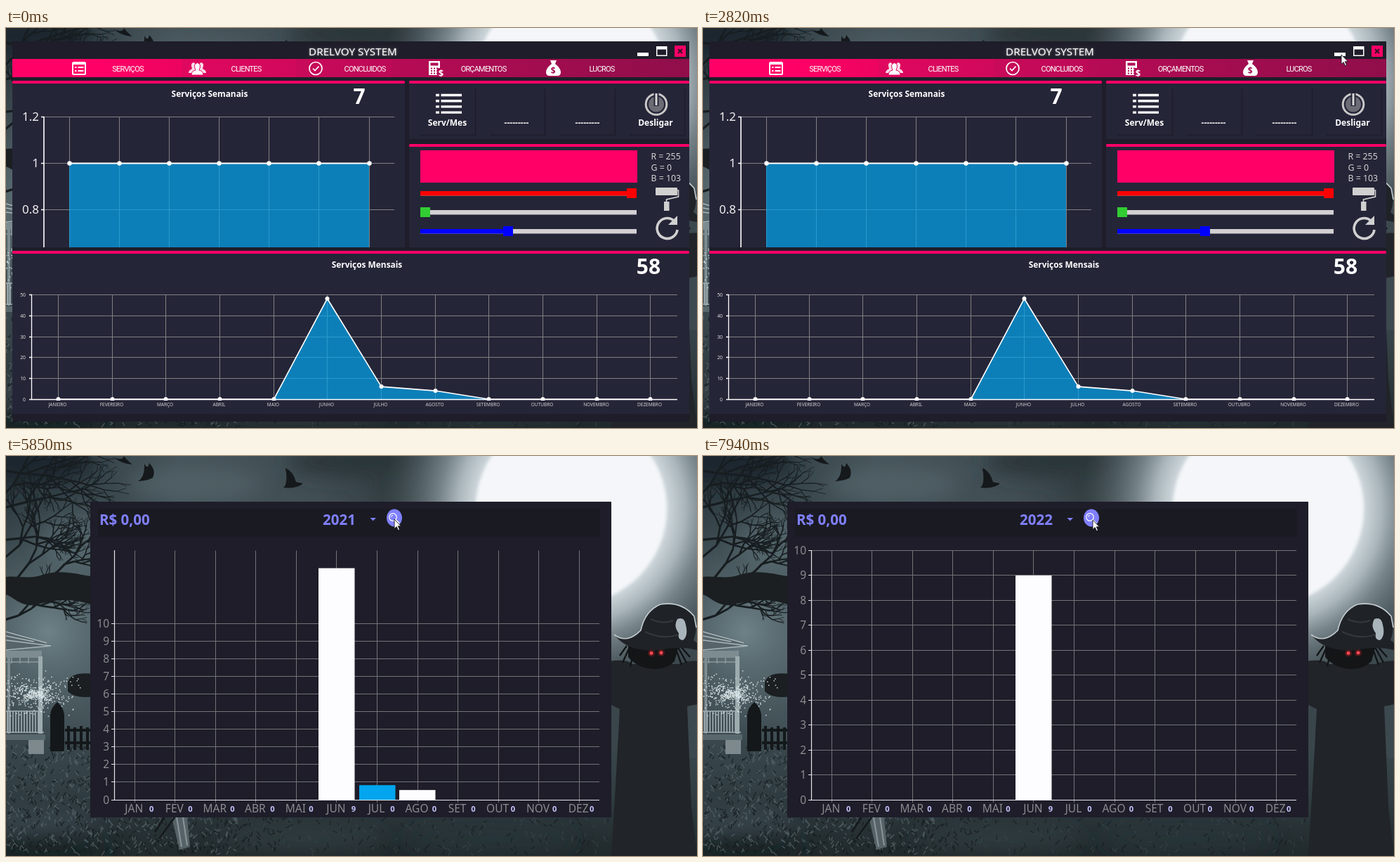
Recreate the animation shown at these times as an HTML page. Size 984 by 569 pixels, loop 8000 ms.

```html
<!DOCTYPE html>
<html lang="pt">
<head>
<meta charset="utf-8">
<title>Painel</title>
<style>
html, body { margin: 0; width: 100%; height: 100%; overflow: hidden; background: #1e1d29; }
svg { display: block; width: 984px; height: 569px; font-family: "Noto Sans", "Open Sans", sans-serif; }
.menu { font: 400 11px Roboto, sans-serif; letter-spacing: -.8px; }
</style>
</head>
<body>
<svg id="stage" viewBox="0 0 984 569"></svg>
<script>
const LOOP = 8000, PINK = '#ff0067', DARK = '#1e1d29', PANEL = '#252538', BLUE = '#03a5ee', LILAC = '#8080ff';
const stage = document.getElementById('stage');
const $ = id => document.getElementById(id);

// Markup helpers
const rect = (x, y, w, h, fill, more = '') => `<rect x="${x}" y="${y}" width="${w}" height="${h}" fill="${fill}" ${more}/>`;
const path = (d, fill = 'none', more = '') => `<path d="${d}" fill="${fill}" ${more}/>`;
const line = (d, color, w = 1, more = '') => path(d, 'none', `stroke="${color}" stroke-width="${w}" ${more}`);
const dot = (x, y, r, fill, more = '') => `<circle cx="${x}" cy="${y}" r="${r}" fill="${fill}" ${more}/>`;
const oval = (x, y, rx, ry, fill, more = '') => `<ellipse cx="${x}" cy="${y}" rx="${rx}" ry="${ry}" fill="${fill}" ${more}/>`;
const text = (x, y, s, size, fill = '#fff', more = '') => `<text x="${x}" y="${y}" font-size="${size}" fill="${fill}" ${more}>${s}</text>`;
const MID = 'text-anchor="middle" ', END = 'text-anchor="end" ', BOLD = 'font-weight="700" ', SEMI = 'font-weight="600" ';
const range = n => [...Array(n).keys()];
const clamp = v => Math.max(0, Math.min(1, v));
const mix = (a, b, p) => a + (b - a) * p;
const ease = p => p * p * (3 - 2 * p);
const easeOut = p => 1 - (1 - p) ** 3;
const snap = v => Math.floor(v) + .5;

let seed = 11;
const rnd = (a = 0, b = 1) => {
  seed = (seed * 16807) % 2147483647;
  return mix(a, b, seed / 2147483647);
};

function branches(x, y, angle, len, depth, out) {
  if (!depth) return;
  const x2 = x + Math.cos(angle) * len, y2 = y + Math.sin(angle) * len;
  out[depth] = (out[depth] || '') + `M${x.toFixed(1)} ${y.toFixed(1)}L${x2.toFixed(1)} ${y2.toFixed(1)}`;
  branches(x2, y2, angle + rnd(-.35, .25), len * rnd(.78, .95), depth - 1, out);
  branches(x2, y2, angle + rnd(.3, .8) * (rnd() < .5 ? -1 : 1), len * rnd(.6, .85), depth - 1, out);
}

function sky() {
  return rect(0, 0, 984, 569, 'url(#sky)') + rect(0, 0, 984, 569, 'url(#mist)') +
    '<g filter="url(#cloud)">' + oval(20, 10, 110, 32, '#1d282d') + oval(270, 40, 95, 24, '#55656b', 'opacity=".7"') +
    oval(500, 8, 100, 22, '#2a3439') + oval(570, 50, 60, 16, '#313c41') + oval(110, 125, 60, 40, '#5b6d73', 'opacity=".7"') + '</g>' +
    rect(0, 0, 984, 569, 'url(#halo)') + dot(805, 75, 136, '#f4f6f9', 'filter="url(#soft)"');
}

function meadow() {
  const blades = (color, n, x0, x1) => line(range(n).map(() => {
    const x = rnd(x0, x1), y = rnd(412, 569);
    return `M${x.toFixed(0)} ${y.toFixed(0)}l${rnd(-6, 6).toFixed(1)} ${rnd(-7, -2).toFixed(1)}`;
  }).join(''), color, 1.3, 'opacity=".7"');
  return path('M0 405Q60 398 130 410V500H850V420L984 430V569H0Z', 'url(#grass)') +
    '<g filter="url(#cloud)">' + oval(40, 520, 90, 14, '#46545a', 'opacity=".6"') + oval(60, 560, 90, 14, '#192022') +
    oval(420, 545, 120, 16, '#36444a', 'opacity=".6"') + oval(690, 545, 120, 18, '#2c383d', 'opacity=".7"') + '</g>' +
    blades('#121719', 700, 0, 400) + blades('#5c6b70', 600, 0, 330) +
    blades('#161c1f', 300, 400, 860) + blades('#3a474c', 250, 330, 860);
}

function gazebo() {
  const sparks = range(520).map(() => {
    const r = rnd() ** 1.5 + .15;
    return `M${(42 + rnd(-66, 66) * r).toFixed(1)} ${(338 + rnd(-30, 30) * r).toFixed(1)}h1.5v1.5h-1.5z`;
  }).join('');
  return path('M0 246L66 270L0 276Z', '#56656a') + line('M0 262L64 270L0 276M0 250L58 266M0 256L40 264', '#a9b7ba', 1.5) +
    rect(0, 277, 51, 10, '#7d8c90') + line('M0 293H48M8 287v8M20 287v8M32 287v8', '#8b999d', 1.5) +
    rect(46, 285, 6, 110, '#9cabae') + rect(2, 285, 4, 110, '#7d8c90') +
    line('M0 363H50M0 393H54' + range(12).map(i => `M${2 + i * 4} 363v30`).join(''), '#a3b1b4', 1.6) +
    rect(0, 396, 56, 8, '#59686c') + rect(32, 404, 22, 20, '#7d898c') + path(sparks, '#e6f0f2', 'opacity=".85"');
}

function scarecrow() {
  const black = '#131517';
  return path('M858 292Q884 288 892 296H958Q972 290 990 292V352L970 356L976 500L984 569H862L868 470L874 360L858 352Z', '#212428') +
    path('M886 270H958L952 292Q940 304 922 303Q900 302 886 286Z', black) +
    line('M888 272L878 294M894 276L889 300M884 270L874 284M953 272L962 297M960 270L974 286M957 272L969 294', black, 2.4) +
    path('M866 254Q884 268 904 248Q910 220 932 211Q962 206 980 228Q986 244 979 262L984 266V276Q960 270 930 276Q886 280 866 254Z', '#1f2226') +
    path('M956 232Q966 228 968 240Q972 256 964 262Q956 262 958 252Q950 242 956 232Z', '#a9b5ba') +
    line('M866 254Q884 268 904 248Q910 220 932 211Q962 206 980 228L983 244', '#c3cdd1', 1.6) +
    line('M910 250Q935 262 958 254M918 232Q936 240 950 234', '#34393e', 2) +
    [[919, 280.5], [933, 280]].map(([x, y]) => dot(x, y, 5, '#7d1a20', 'opacity=".6"') + dot(x, y, 2.4, '#ff4a55')).join('');
}

function wallpaper() {
  const twigs = [];
  [[-8, 150, -.7, 36], [-8, 75, -.25, 38], [-8, 60, -.8, 26], [15, 175, -.9, 28], [-8, 235, -.3, 27], [70, 168, -.8, 20],
    [-8, 20, .15, 36], [30, 205, .4, 20], [-8, 120, -.1, 28]]
    .forEach(([x, y, a, l]) => branches(x, y, a, l, 7, twigs));
  return sky() + meadow() + twigs.map((d, i) => line(d, '#171d20', i * .4 + .4)).join('') +
    path('M0 172C20 170 32 176 52 169C80 161 100 168 125 172V213C95 201 72 204 40 212C20 214 10 200 0 197Z', '#1b1f22') +
    path('M88 322Q92 306 125 310V342Q100 346 88 335Z', '#1b1f22') + gazebo() +
    path('M63 420V368Q64 358 73 350Q82 358 83 368V420Z', '#14181a') +
    line('M84 390H125M84 408H125M89 418V384M98 418V386M107 418V384M116 418V386', '#14181a', 4) +
    path('M236 514H258L262 556L247 560Z', '#566266') + line('M243 514L250 556M252 514L258 554', '#87949a', 2) +
    line('M225 514L212 535M240 514L218 545', '#161b1d', 3) +
    path('M152 1Q166 8 168 0Q172 6 180 12Q166 12 152 1ZM188 36Q198 30 197 11Q202 20 204 10Q214 20 209 31Q202 35 188 36ZM395 45Q402 40 398 17Q409 22 413 37L423 39Q414 47 395 45Z', '#15191b') +
    scarecrow();
}

const panel = (x, y, w, h) => rect(x, y + 2, w, h - 2, PANEL) + rect(x, y, w, 4, PINK, 'rx="1.5"');

function menuBar() {
  const labels = [[173.5, 'SERVIÇOS'], [342, 'CLIENTES'], [511, 'CONCLUIDOS'], [680, 'ORÇAMENTOS'], [848.5, 'LUCROS']];
  return rect(9, 44, 964, 26, 'url(#bar)') +
    labels.map(([x, s]) => text(x, 61.5, s, 11, '#fff', `class="menu" ${MID}`)).join('') +
    rect(95, 49, 18, 17, 'none', 'rx="1.5" stroke="#fff" stroke-width="2"') + rect(95, 49, 18, 3, '#fff') +
    line('M98 56h2.5M98 61h2.5M102.5 56h8M102.5 61h8', '#fff', 2.2) +
    path('M260 64Q260 60 265 58Q262 50 267 49Q271 50 269 57L276 57Q274 50 278 49Q283 50 280 58Q285 60 285 64Z', '#fff', 'opacity=".85"') +
    path('M264 67Q264 61 270 60Q266 51 272.5 49.5Q279 51 275 60Q281 61 281 67Z', '#fff', 'stroke="#df075f"') +
    dot(441, 57.5, 9, 'none', 'stroke="#fff" stroke-width="1.7"') + line('M437 57.5l3 3l5.5-6', '#fff', 1.7) +
    path('M602 47h16v20h-16zM604.5 49.5v4h11v-4z', '#fff', 'fill-rule="evenodd"') +
    line('M605 57.5h11M605 61h11M605 64.5h11', '#b30b54', 2, 'stroke-dasharray="2 2"') +
    rect(614, 57, 11, 12, '#b30b54') + text(619.5, 68.5, '$', 13, '#fff', MID + BOLD) +
    path('M775 46h9l-2 5q8 6 8 12q0 5-5 5h-11q-5 0-5-5q0-6 8-12z', '#fff') +
    text(779.3, 65, '$', 12, '#a60c50', MID + BOLD);
}

function weekly() {
  const xs = range(7).map(i => snap(90 + i * 71.17));
  return panel(9, 75, 559, 237) + text(290, 97.5, 'Serviços Semanais', 11.9, '#fff', MID + SEMI) +
    text(503, 108, 7, 30, '#fff', MID + SEMI) +
    line('M54 126.5H553M54 192.5H553M54 258.5H553' + xs.map(x => `M${x} 126V312`).join(''), '#808080') +
    rect(90, 192.5, 427, 119.5, BLUE, 'opacity=".7"') +
    line('M54 126V312M50 126.5h4M50 192.5h4M50 258.5h4', '#fff', 1.6) +
    line('M90 192.5H517', '#fff', 1.8) + xs.map(x => dot(x, 192.5, 3.2, '#fff')).join('') +
    [['1.2', 131.5], ['1', 197.5], ['0.8', 263.5]].map(([s, y]) => text(47, y, s, 17, '#f0f0f0', END)).join('');
}

function monthly() {
  const names = ['JANEIRO', 'FEVEREIRO', 'MARÇO', 'ABRIL', 'MAIO', 'JUNHO', 'JULHO', 'AGOSTO', 'SETEMBRO', 'OUTUBRO', 'NOVEMBRO', 'DEZEMBRO'];
  const pts = names.map((_, i) => [snap(74.5 + i * 76.65), 528 - ([48, 6, 4][i - 5] || 0) * 2.98]);
  const d = 'M' + pts.map(p => p.join(' ')).join('L');
  const ys = range(6).map(i => snap(528.5 - i * 29.8));
  return panel(9, 317, 964, 232) + text(514, 341, 'Serviços Mensais', 11.9, '#fff', MID + SEMI) +
    text(915, 350, 58, 30, '#fff', MID + SEMI) +
    line(ys.map(y => `M36 ${y}H956`).join('') + pts.map(p => `M${p[0]} 379V528`).join(''), '#808080') +
    path(d + 'Z', BLUE, 'opacity=".7"') +
    line('M36.5 379V528.5H956' + ys.map(y => `M33 ${y}h4`).join(''), '#fff', 1.3) + line(d, '#fff', 1.6) +
    `<g clip-path="url(#plot)">${pts.map(p => dot(...p, 3, '#fff')).join('')}</g>` +
    ys.map((y, i) => text(28, y + 2.2, i * 10, 6.8, '#e0e0e0', END)).join('') +
    names.map((s, i) => text(pts[i][0] - 1, 538, s, 6.5, '#d0d0d0', MID)).join('');
}

function tools() {
  const label = (x, s) => text(x, 138.5, s, 12, '#fff', MID + SEMI);
  const slider = (y, end, color, knob) => rect(590, y - 3, 308, 6.5, '#d3d0d3') +
    rect(590, y - 3, end - 590, 6.5, color) + rect(knob, y - 7, 14, 14, color);
  return panel(574, 75, 399, 83) + panel(574, 165, 399, 147) +
    [590, 689, 789, 888].map(x => line(`M${x} 152.5H${x + 78.5}V86`, '#1d1c2a', 1.5)).join('') +
    rect(590, 87, 78, 64, PINK, 'id="hot"') +
    line(range(4).map(i => `M612 ${95.5 + i * 8.2}h5M619.5 ${95.5 + i * 8.2}H649`).join(''), '#fff', 3.4) +
    label(628.5, 'Serv/Mes') + label(727, '---------') + label(828, '---------') + label(925, 'Desligar') +
    dot(926, 108.5, 14.8, 'none', 'stroke="#c8c8c8" stroke-width="3"') + dot(926, 108.5, 11, '#6c6c76') +
    line('M926 92V111', PANEL, 7) + line('M926 93V110', '#d8d8d8', 3) +
    rect(590, 174, 309, 46, PINK) + slider(235, 898, '#f00', 884) + slider(262, 590, '#32cd32', 590) + slider(289, 715, '#00f', 708) +
    ['R = 255', 'G = 0', 'B = 103'].map((s, i) => text(918.5, 187 + i * 15.6, s, 12.3, '#d3d3d3')).join('') +
    rect(925, 227, 31, 11, '#d0d0d0', 'rx="1"') + line('M956 231h1.5v9l-17 4v4', '#d0d0d0', 1.6) + rect(937, 247, 7.5, 13, '#d0d0d0') +
    line('M951 274A14.5 14.5 0 1 0 956 287', '#d0d0d0', 3.6) + path('M956 267V280H943Z', '#d0d0d0');
}

function dashboard() {
  return rect(9, 19, 964, 541, DARK) +
    text(494, 38.5, 'DRELVOY SYSTEM', 15.2, '#fff', MID + 'filter="url(#glow)"') +
    rect(899, 35, 16, 5, '#fff') + path('M926 26h15.5v14h-15.5zM927.5 30.5v8h12.5v-8z', '#fff', 'fill-rule="evenodd"') +
    rect(952, 25, 16, 16, PINK) + line('M957 30l6 6m0-6l-6 6', '#3a1028', 2.2) +
    menuBar() + weekly() + tools() + monthly();
}

// Bar chart window
const MONTHS = ['JAN', 'FEV', 'MAR', 'ABR', 'MAI', 'JUN', 'JUL', 'AGO', 'SET', 'OUT', 'NOV', 'DEZ'];
const GAPS = [24, 21.5, 24, 23.5, 21, 24, 22, 24, 22, 21, 22.5, 18];
const monthX = i => 183.3 + i * 57.53;
const BASE = 489, FULL = 354.5, RELOAD = 5730;

function chart(t) {
  const p = easeOut(clamp((t - RELOAD) / 450)), grow = easeOut(clamp((t - 1850) / 450));
  const fresh = t >= RELOAD, step = FULL / (fresh ? 10 : 8);
  const ticks = range(fresh ? 11 : 9).map(i => [fresh ? i : i * 5, snap(BASE - i * (fresh ? mix(FULL / 40, step, p) : step))]);
  const bars = [[5, mix(39 / 40, .9, p)], [6, mix(6 / 40, 0, p)], [7, mix(4 / 40, 0, p)]];
  const counts = fresh ? [9, 0, 0] : [39, 6, 4];
  return line(ticks.map(k => `M154 ${k[1]}H845`).join('') + MONTHS.map((_, i) => `M${snap(monthX(i))} 134.5V493`).join(''), '#737378') +
    bars.map(([i, v]) => rect(Math.round(monthX(i) - 25.9), BASE - v * FULL * grow, 51.5, v * FULL * grow, i === 6 ? BLUE : '#fdfdff')).join('') +
    line(`M154.5 134V${snap(BASE)}H845` + ticks.map(k => `M150 ${k[1]}h4`).join(''), '#e6e6ea', 1.2) +
    ticks.map(k => text(147, k[1] + 5.5, k[0], 15.5, '#8c8c90', END)).join('') +
    MONTHS.map((s, i) => text(monthX(i) - 1, 507, s, 15.5, '#8c8c90', MID) +
      text(monthX(i) + GAPS[i], 505.5, counts[i - 5] || 0, 11.2, '#c6c6ff', MID + BOLD)).join('');
}

function header(t, [cx, cy]) {
  const hover = t > 4850 && Math.hypot(cx - 553, cy - 88) < 12;
  const year = t < 4850 ? 2020 : t < 7520 ? 2021 : 2022;
  const shade = t >= RELOAD ? rect(131, 75, 715, 39.5, '#1a1a23') : t >= 4850 ? rect(443, 83, 95, 32, '#1a1a23') : '';
  return shade + text(133, 98, t < RELOAD ? 'R$ 1968,00' : 'R$ 0,00', 20.5, LILAC, BOLD) +
    text(451, 97.5, year, 20.5, LILAC, BOLD) + path('M518.5 88h8.5l-4.25 4.2z', LILAC) +
    (hover ? oval(553, 88, 11, 12.5, LILAC) : '') +
    dot(551, 87, 5.3, 'none', 'stroke="#fff" stroke-width="1.2"') +
    line('M548.5 87q0-2.5 2.5-2.5', '#fff') + line('M555 91l5 5', '#fff', 2.2);
}

function dropdown(t, [, cy]) {
  const first = t >= 3800 && t < 4850;
  if (!first && !(t >= 6750 && t < 7520)) return '';
  const age = t - (first ? 3800 : 6750), row = 30.5;
  const h = mix(46, 305, clamp((age - 20) / 190));
  const edge = line(`M535 113V${120 + h}H448`, '#121219', 2);
  if (age < 25) return edge;
  const hot = cy > 115 ? Math.floor((cy - 115) / row) : first ? 0 : 1;
  return edge + `<g clip-path="url(#drop)"><g transform="translate(0 ${h - 305})">` + rect(443, 115, 91, 305, DARK) +
    range(10).map(i => (i === hot ? rect(443, 115 + i * row, 91, row, '#6458ff') : '') +
      text(451, 137.5 + i * row, 2020 + i, 20.5, i === hot ? '#fff' : LILAC, BOLD)).join('') + '</g></g>';
}

// Pointer stops: time, x, y
const STOPS = [[500, 645, -4], [1280, 626, 129], [1310, 627, 130], [1850, 627, 130], [2470, 909, 38], [2950, 909, 38],
  [3560, 506, 89], [3950, 506, 89], [4330, 479, 154], [4900, 479, 154], [5650, 553, 90], [6000, 553, 90],
  [6520, 496, 90], [6550, 494, 89], [6900, 494, 89], [7300, 480, 186], [7540, 480, 186], [7930, 555, 91], [LOOP, 555, 91]];

function pointer(t) {
  const i = STOPS.findIndex(s => s[0] > t);
  if (i < 1) return STOPS[0].slice(1);
  const [a, b] = [STOPS[i - 1], STOPS[i]], p = ease((t - a[0]) / (b[0] - a[0]));
  return [mix(a[1], b[1], p), mix(a[2], b[2], p)];
}

const shades = stops => stops.map(([o, c, a = 1]) => `<stop offset="${o}" stop-color="${c}" stop-opacity="${a}"/>`).join('');
const radial = (id, x, y, r, stops) => `<radialGradient id="${id}" gradientUnits="userSpaceOnUse" cx="${x}" cy="${y}" r="${r}">${shades(stops)}</radialGradient>`;
const linear = (id, dir, stops) => `<linearGradient id="${id}" ${dir}>${shades(stops)}</linearGradient>`;
const clip = (id, x, y, w, h) => `<clipPath id="${id}">${rect(x, y, w, h, '#000')}</clipPath>`;

stage.innerHTML = '<defs>' +
  linear('sky', 'x2="1" y2="0"', [[0, '#2b383d'], [.25, '#45545a'], [.45, '#414e54'], [.6, '#333e43'], [1, '#3c494e']]) +
  radial('mist', 60, 250, 220, [[0, '#71858b', .95], [1, '#4a5b61', 0]]) +
  radial('halo', 805, 75, 270, [[0, '#e4eaee'], [.5, '#d0d9dd'], [.6, '#a9b5ba'], [.7, '#7d8a90', .9], [1, '#49575c', 0]]) +
  linear('grass', 'x2="0" y2="1"', [[0, '#3a484d'], [.5, '#303c40'], [1, '#20292c']]) +
  linear('bar', 'x2="1"', [[0, PINK], [.12, PINK], [.25, '#ec045f'], [.25, '#e0075f'], [.42, '#d0095b'], [.42, '#c90a5a'], [.56, '#bd0a57'], [.56, '#b70b55'], [.8, '#a00d4f'], [1, '#900e4b']]) +
  clip('drop', 443, 115, 91, 310) + clip('plot', 30, 370, 930, 160) +
  '<filter id="soft"><feGaussianBlur stdDeviation="2"/></filter>' +
  '<filter id="cloud" x="-20%" y="-50%" width="140%" height="200%"><feGaussianBlur stdDeviation="14"/></filter>' +
  '<filter id="glow"><feDropShadow dx="0" dy="0" stdDeviation="1.5" flood-color="#fff" flood-opacity=".55"/></filter></defs>' +
  `<g>${wallpaper()}</g><g id="modal">${rect(120, 65, 742, 449, DARK)}<g id="chart"></g><g id="head"></g><g id="menu"></g></g>` +
  `<g id="dash">${dashboard()}</g><g id="cursor" stroke="#15151c" stroke-width=".9">` +
  path('M0 0V13.5L3.2 10.6L5.4 15.6L7.5 14.7L5.3 9.8H9.5Z', '#fff', 'id="arrow"') +
  path('M-1.7 1.5Q0 -1.5 1.7 1.5V6L6.5 7.2Q8.4 8 8 11L7 16H-1.5L-5.5 10.5Q-5.5 8 -3.5 9L-1.7 10.5Z', '#fff', 'id="hand"') + '</g>';

const cache = {};
function fill(id, markup) {
  if (cache[id] !== markup) $(id).innerHTML = cache[id] = markup;
}
const show = (id, on) => $(id).setAttribute('display', on ? 'inline' : 'none');
const zoom = (x, y, s) => `translate(${x * (1 - s)} ${y * (1 - s)}) scale(${s})`;
const [modal, dash, cursor] = ['modal', 'dash', 'cursor'].map($);
let order;

function render(t) {
  const pos = pointer(t), over = t >= 500 && t < 1770 && pos[1] >= 87;
  const top = t >= 1770 && t < 2820;
  if (order !== top) {
    order = top;
    stage.append(...(top ? [dash, modal] : [modal, dash]), cursor);
  }
  const open = easeOut(clamp((t - 1770) / 200)), gone = clamp((t - 2910) / 240);
  show('modal', t >= 1770);
  modal.setAttribute('opacity', open);
  modal.setAttribute('transform', zoom(491, 290, mix(.9, 1, open)));
  show('dash', gone < 1);
  dash.setAttribute('opacity', 1 - gone);
  dash.setAttribute('transform', zoom(491, 560, 1 - .35 * gone * gone));
  show('hot', over);
  fill('chart', chart(t));
  fill('head', header(t, pos));
  fill('menu', dropdown(t, pos));
  show('cursor', t >= 500);
  show('hand', over);
  show('arrow', !over);
  cursor.setAttribute('transform', `translate(${pos[0].toFixed(1)} ${pos[1].toFixed(1)})`);
}

const start = performance.now();
function tick() {
  render((performance.now() - start) % LOOP);
  requestAnimationFrame(tick);
}
tick();
</script>
</body>
</html>
```
